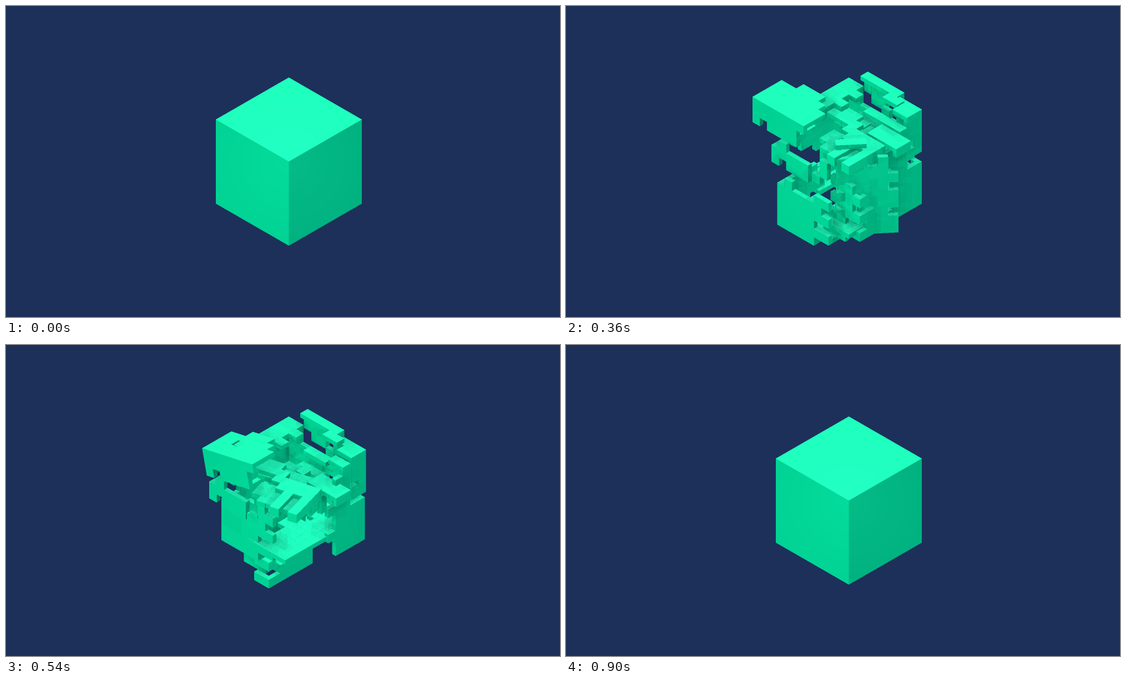
Recreate the animation shown at these times as an HTML page with a canvas. Size 998 by 561 pixels, loop 0.93 s.

```html
<!DOCTYPE html>
<html lang="en">
<head>
<meta charset="utf-8">
<title>Shattering cube</title>
<style>
html, body { margin: 0; width: 100%; height: 100%; overflow: hidden; background: #1c305a; }
canvas { display: block; position: absolute; left: 300px; top: 95px; }
</style>
</head>
<body>
<canvas id="view" width="390" height="370"></canvas>
<script>
const ctx = document.getElementById('view').getContext('2d');
const W = 390, H = 370, LEFT = 300, TOP = 95;
const SS = 2, BW = W * SS, BH = H * SS;
const N = 10, THICK = 0.5;
const UX = 13.15, UY = 7.58;
const LOOP = 930, STEP = 30;
const BG = [28, 48, 90];
const TIMES = [0, 240, 360, 480, 630, 750, 900];

// Base colour for each face direction: -a, +a, -b, +b, -c, +c.
const TONES = [
  [0, 190, 135], [0, 176, 126],
  [0, 176, 124], [0, 209, 147],
  [0, 160, 112], [30, 255, 188]
];

// box: a, b and c ranges; a, b, c, r: offsets and turn at the inner key times.
const pieces = [
  { face: 4, box: [6, 10, 0, 10, 0, 10],
    a: [0, 0, -.4, 0, 0], b: [0, 0, .4, 0, 0], c: [0, .8, 3.4, .3, 0] },
  { exact: true, box: [2, 3, 7, 8, 9, 10],
    a: [-.5, -3.2, -1.4, -1, 0], b: [.6, 0, 0, .8, 0], c: [0, 1.1, 1.4, .5, -1] },
  { exact: true, box: [5, 6, 3, 4, 9, 10], c: [0, -1, -3, 0, -1] },
  { exact: true, box: [6, 10, 3, 5, 9, 10],
    a: [2, 1.5, 1.5, 1.5, 2.2], c: [0, -.3, -2, -.4, 0] },
  { box: [2, 5, 1.5, 4, 8, 10], c: [-1.4, -2, -4, -1.4, 0] },
  { box: [2, 7, 0, 2, 7.5, 10], b: [-.5, -.6, -.6, -.5, 0], c: [.6, 1.4, 2, .6, 0] },
  { box: [0, 7, 6, 10, 6.8, 10], axis: 1, pivot: [2.5, 7.5, 8],
    a: [-.5, -3.2, -1.4, -1, 0], b: [.6, 0, 0, .8, 0],
    c: [0, 1.1, 1.4, .5, 0], r: [0, 0, 0, -35, 0] },
  { box: [0, 4.5, 7, 10, 4.8, 8],
    a: [-.5, -.3, -.3, -1.5, 0], b: [.6, .3, 0, .5, 0] },
  { box: [0, 6, 5, 10, 0, 5.4],
    a: [.8, 1.4, 1, .4, -.15], b: [0, 1.2, 0, 0, 0], c: [2.2, -1.2, .9, .2, 0] },
  { box: [4.5, 9, 8, 10, 0, 6],
    a: [-1, .5, -8.2, 0, 0], b: [-.5, -1, -5, -2.2, -1.4], c: [-.6, -.8, -6.6, -.3, 0] },
  { box: [8, 10, 4.5, 10, 0, 9.2], axis: 2, pivot: [9.5, 7, 5],
    a: [0, 0, -8.2, 0, 0], b: [1.5, 0, -5, 1.9, 0],
    c: [-.1, 0, -6.6, -.2, 0], r: [0, 40, 0, 0, 0] },
  { box: [4, 9, 9, 10, 5, 8.8], a: [0, 0, -.5, 0, 0], c: [0, -.8, -1.5, 0, 0] },
  { plate: true, box: [2.5, 10, 3, 10, 8, 10], axis: 2, pivot: [6, 6, 10],
    b: [0, 0, 1.8, 0, 0], c: [0, -.6, -2, 0, 0], r: [0, 0, -25, 0, 0] },
  { box: [5, 10, 0, 1.5, 4.5, 10],
    b: [-1.3, 0, -.1, -1.35, 0], c: [-.4, 1.2, 1.4, -.4, 0] },
  { box: [8, 10, 0, 5, 0, 10], b: [0, 0, -.65, 0, 0], c: [0, 0, .3, 0, 0] },
  { box: [0, 10, 0, 10, 0, 10] }
];

const hash = (x, y, z) => {
  const s = Math.sin(x * 12.99 + y * 78.23 + z * 37.72) * 43758.55;
  return s - Math.floor(s);
};

// Boundaries shift per row of cells, which makes interlocking tabs.
function pieceOf(cell, face) {
  const rough = cell.map((v, m) => {
    const shift = (hash(cell[(m + 1) % 3], cell[(m + 2) % 3], m + 1) - .5) * 2;
    return Math.min(9.9, Math.max(.1, v + .5 + shift));
  });
  return pieces.findIndex(p => {
    if (p.face !== undefined && p.face !== face) return false;
    return cell.every((v, m) => {
      const x = p.exact ? v + .5 : rough[m];
      return x >= p.box[2 * m] && x <= p.box[2 * m + 1];
    });
  });
}

const slabs = [];
for (let face = 0; face < 6; face++) {
  const m = face >> 1, p = (m + 1) % 3, q = (m + 2) % 3, far = face & 1;
  for (let u = 0; u < N; u++) for (let v = 0; v < N; v++) {
    const cell = [], size = [1, 1, 1];
    cell[m] = far ? N - 1 : 0;
    cell[p] = u;
    cell[q] = v;
    const piece = pieceOf(cell, face);
    const lo = cell.slice();
    if (far) lo[m] = N - THICK;
    size[m] = THICK;
    slabs.push({ lo, size, piece });
  }
}

// A second layer keeps the lid whole where other pieces leave it.
const lid = pieces.findIndex(p => p.plate);
for (let j = 3; j < N - 1; j++) {
  for (let i = 3 + Math.round(hash(j, 2, 5) * 2); i < N - 1; i++) {
    slabs.push({ lo: [i, j, 8.9], size: [1, 1, THICK], piece: lid });
  }
}

// Smooth curve through the keys that never overshoots them.
function track(keys, t) {
  if (!keys) return 0;
  const v = [0, ...keys, 0];
  const slope = i => (v[i + 1] - v[i]) / (TIMES[i + 1] - TIMES[i]);
  const tangent = i => {
    if (i === 0 || i === v.length - 1) return 0;
    const s = slope(i - 1), e = slope(i);
    return s * e <= 0 ? 0 : 2 * s * e / (s + e);
  };
  let i = 0;
  while (i < v.length - 2 && t > TIMES[i + 1]) i++;
  const d = TIMES[i + 1] - TIMES[i], x = Math.min(1, (t - TIMES[i]) / d);
  const x2 = x * x, x3 = x2 * x;
  return v[i] * (2 * x3 - 3 * x2 + 1) + v[i + 1] * (3 * x2 - 2 * x3) +
    d * (tangent(i) * (x3 - 2 * x2 + x) + tangent(i + 1) * (x3 - x2));
}

// Isometric projection: screen x, screen y, nearness.
const project = ([a, b, c]) => [UX * (a - b) * SS, UY * (a + b - 2 * c) * SS, a + b + c];

function pose(piece, t) {
  const axis = piece.axis || 0, pivot = piece.pivot || [0, 0, 0];
  const angle = track(piece.r, t) * Math.PI / 180;
  const cos = Math.cos(angle), sin = Math.sin(angle);
  const p = (axis + 1) % 3, q = (axis + 2) % 3;
  const basis = [[1, 0, 0], [0, 1, 0], [0, 0, 1]];
  basis[p][p] = basis[q][q] = cos;
  basis[p][q] = sin;
  basis[q][p] = -sin;
  const origin = [piece.a, piece.b, piece.c].map((keys, m) =>
    track(keys, t) + pivot[m] - pivot.reduce((sum, x, i) => sum + x * basis[i][m], 0));
  const start = project(origin);
  start[0] += (509.5 - LEFT) * SS;
  start[1] += (129 + 2 * N * UY - TOP) * SS;
  const normals = [], colors = [];
  for (let f = 0; f < 6; f++) {
    const n = basis[f >> 1].map(x => f & 1 ? x : -x);
    normals.push(n);
    colors.push([0, 1, 2].map(ch => n.reduce((sum, x, m) =>
      sum + x * x * TONES[2 * m + (x > 0 ? 1 : 0)][ch], 0)));
  }
  return { start, axes: basis.map(project), normals, colors };
}

const depth = new Float32Array(BW * BH);
const ids = new Uint8Array(BW * BH);

function fillQuad(o, u, v, id) {
  const det = u[0] * v[1] - u[1] * v[0];
  if (Math.abs(det) < 1e-6) return;
  const range = (k, max) => [
    Math.max(0, Math.floor(o[k] + Math.min(0, u[k]) + Math.min(0, v[k]))),
    Math.min(max - 1, Math.ceil(o[k] + Math.max(0, u[k]) + Math.max(0, v[k])))
  ];
  const [x0, x1] = range(0, BW), [y0, y1] = range(1, BH);
  for (let y = y0; y <= y1; y++) {
    const dy = y + .5 - o[1];
    for (let x = x0; x <= x1; x++) {
      const dx = x + .5 - o[0];
      const s = (dx * v[1] - dy * v[0]) / det;
      if (s < -.01 || s > 1.01) continue;
      const r = (dy * u[0] - dx * u[1]) / det;
      if (r < -.01 || r > 1.01) continue;
      const z = o[2] + s * u[2] + r * v[2], k = y * BW + x;
      if (z > depth[k]) {
        depth[k] = z;
        ids[k] = id;
      }
    }
  }
}

// Points in a ball, used for soft contact shadows.
const probes = Array.from({ length: 24 }, (_, i) => {
  const z = 1 - (2 * i + 1) / 24, w = Math.sqrt(1 - z * z), turn = i * 2.39996;
  const r = .5 + 2.1 * hash(i, 3, 7);
  return [w * Math.cos(turn) * r, w * Math.sin(turn) * r, z * r];
});

function occlusion(x, y, z, n) {
  let hits = 0;
  for (const o of probes) {
    const k = o[0] * n[0] + o[1] * n[1] + o[2] * n[2] < 0 ? -1 : 1;
    const a = o[0] * k, b = o[1] * k, c = o[2] * k;
    const px = Math.round(x + UX * (a - b) * SS);
    const py = Math.round(y + UY * (a + b - 2 * c) * SS);
    if (px < 0 || py < 0 || px >= BW || py >= BH) continue;
    const gap = depth[py * BW + px] - (z + a + b + c);
    if (gap > .3 && gap < 4.5) hits++;
  }
  return hits / probes.length;
}

function render(t) {
  depth.fill(-1e6);
  ids.fill(255);
  const poses = pieces.map(p => pose(p, t));
  for (const { lo, size, piece } of slabs) {
    const { start, axes, normals } = poses[piece];
    for (let f = 0; f < 6; f++) {
      const n = normals[f];
      if (n[0] + n[1] + n[2] <= 1e-6) continue;
      const m = f >> 1, p = (m + 1) % 3, q = (m + 2) % 3;
      const corner = lo.slice();
      if (f & 1) corner[m] += size[m];
      const o = start.map((s, i) =>
        s + corner[0] * axes[0][i] + corner[1] * axes[1][i] + corner[2] * axes[2][i]);
      // Inner sides sit slightly back so closed joints stay invisible.
      if (corner[m] > 0 && corner[m] < N) o[2] -= .08;
      fillQuad(o, axes[p].map(e => e * size[p]), axes[q].map(e => e * size[q]), piece * 6 + f);
    }
  }
  const normals = poses.flatMap(p => p.normals), colors = poses.flatMap(p => p.colors);
  const img = ctx.createImageData(W, H), out = img.data;
  for (let y = 0; y < H; y++) for (let x = 0; x < W; x++) {
    let red = 0, green = 0, blue = 0, shade = -1;
    const glow = Math.max(0, 1 - Math.hypot(x + LEFT - 509.5, y + TOP - 281) / 170);
    for (let s = 0; s < SS * SS; s++) {
      const bx = x * SS + s % SS, by = y * SS + (s >> 1), k = by * BW + bx;
      const id = ids[k];
      if (id === 255) {
        red += BG[0]; green += BG[1]; blue += BG[2];
        continue;
      }
      if (shade < 0) shade = 1 - .6 * occlusion(bx, by, depth[k], normals[id]);
      const col = colors[id];
      red += (col[0] + 4 * glow) * shade;
      green += Math.min(255, col[1] + 11 * glow) * shade;
      blue += (col[2] + 8 * glow) * shade;
    }
    const j = (y * W + x) * 4;
    out[j] = red / 4;
    out[j + 1] = green / 4;
    out[j + 2] = blue / 4;
    out[j + 3] = 255;
  }
  return img;
}

const cache = [];
let shown = -1;
function tick() {
  const step = Math.floor(performance.now() % LOOP / STEP);
  if (step !== shown) {
    cache[step] = cache[step] || render(step * STEP);
    ctx.putImageData(cache[step], 0, 0);
    shown = step;
  }
  requestAnimationFrame(tick);
}
tick();
</script>
</body>
</html>
```
